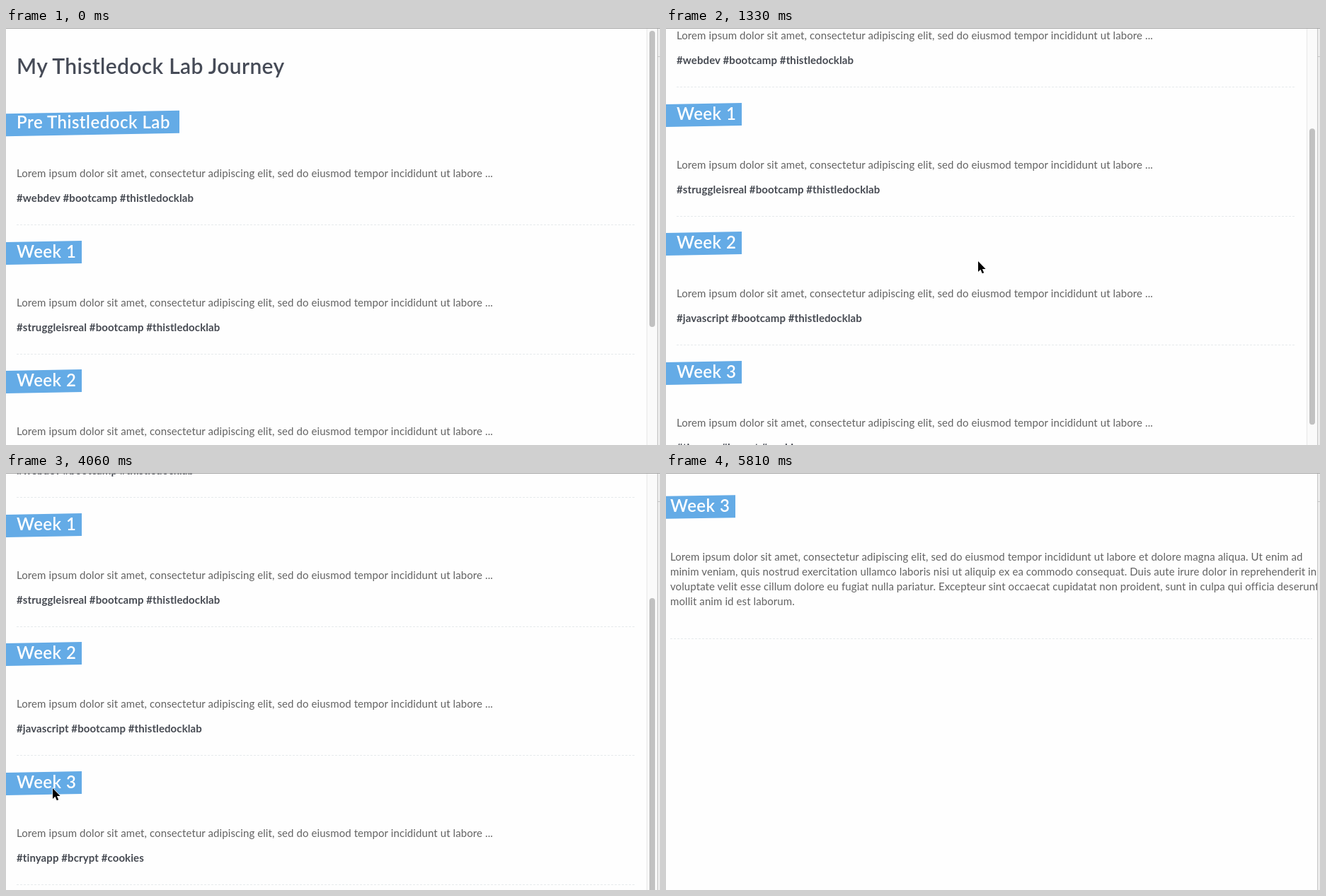
An HTML page that plays this animation: 924x590 px, repeating every 5.95 s.

```html
<!DOCTYPE html>
<html lang="en">
<head>
<meta charset="utf-8">
<title>Journey blog</title>
<style>
  html, body { margin: 0; height: 100%; overflow: hidden; background: #fefefe; }
  svg { display: block; font-family: Lato, sans-serif; }
  .heading { font-size: 30px; font-weight: 600; letter-spacing: .35px; fill: #464b57; }
  .title { font-size: 24px; font-weight: 600; letter-spacing: .5px; fill: #fff; }
  .copy { font-size: 15px; letter-spacing: .09px; fill: #636363; }
  .tags { font-size: 15px; font-weight: 700; letter-spacing: .1px; fill: #464a52; }
  .status { font: 13px "Liberation Sans", Arial, sans-serif; letter-spacing: .1px; fill: #50555c; }
  .banner { fill: #64abe6; }
  .rule { stroke: #e6eaec; stroke-dasharray: 3 2; }
</style>
</head>
<body>
<svg width="924" height="590" viewBox="0 0 924 590">
  <g id="list">
    <g id="posts"></g>
    <path d="M905 0h15v590h-15z" fill="#fafafa"/>
    <path d="M905.5 0v590" stroke="#e8e8e8"/>
    <rect id="thumb" x="909" width="8" height="419" rx="4" fill="#c1c1c1"/>
  </g>
  <path id="spinner" d="M445.2 34.2A19.5 19.5 0 0 1 472.8 34.2" fill="none" stroke="#7aa8cb" stroke-width="2"/>
  <g id="post"></g>
  <g id="status">
    <path d="M0 578h139q4 0 4 4v8H0z" fill="#adadad"/>
    <text class="status" x="4" y="593">localhost:8080/posts/5</text>
  </g>
  <path d="M921 0h3v590h-3z" fill="#ececec"/>
  <path d="M920.5 0v590M921 40.5h3" stroke="#c6c6c6"/>
  <path d="M0 .5h924" stroke="#a6a6a6"/>
  <path id="cursor" d="M0 0V15L3.4 11.8 5.8 17.3 8.2 16.2 5.9 10.9H10.6Z" stroke="#fff" stroke-width="1.2" paint-order="stroke"/>
</svg>
<script>
const LOOP = 5950, STEP = 70;
const $ = id => document.getElementById(id);

const lorem = "Lorem ipsum dolor sit amet, consectetur adipiscing elit, sed do eiusmod tempor incididunt ut labore ";
const article = [
  lorem + "et dolore magna aliqua. Ut enim ad",
  "minim veniam, quis nostrud exercitation ullamco laboris nisi ut aliquip ex ea commodo consequat. Duis aute irure dolor in reprehenderit in",
  "voluptate velit esse cillum dolore eu fugiat nulla pariatur. Excepteur sint occaecat cupidatat non proident, sunt in culpa qui officia deserunt",
  "mollit anim id est laborum."
];
const entries = [
  ["Pre Thistledock Lab", "#webdev #bootcamp #thistledocklab", 230],
  ["Week 1", "#struggleisreal #bootcamp #thistledocklab", 92],
  ["Week 2", "#javascript #bootcamp #thistledocklab", 92],
  ["Week 3", "#tinyapp #bcrypt #cookies", 92]
];

const text = (cls, x, y, s) => `<text class="${cls}" x="${x}" y="${y}">${s}</text>`;
const rule = (x1, x2, y) => `<path class="rule" d="M${x1} ${y + .5}H${x2}"/>`;

// Blue label skewed by one degree about its middle
function banner(x, y, width, title) {
  const right = x + width, tilt = right * Math.tan(Math.PI / 180) / 2;
  return `<path class="banner" d="M0 ${y + tilt}L${right} ${y - tilt}v32L0 ${y + 32 + tilt}z"/>`
    + text("title", x, y + 23, title);
}

$("posts").innerHTML = text("heading", 15, 65, "My Thistledock Lab Journey")
  + entries.map(([title, tags, width], i) => {
    const y = 119 + Math.round(i * 548 / 3);
    return banner(15, y, width, title) + text("copy", 15, y + 92, lorem + "...")
      + text("tags", 15, y + 127, tags) + rule(15, 889, y + 159);
  }).join("");

$("post").innerHTML = banner(6, 32, 92, "Week 3")
  + article.map((line, i) => text("copy", 6, 124 + 21 * i, line)).join("") + rule(6, 913, 234);

// Keys: [time, value, ...]
const scrollKeys = [[630, 0], [700, 4], [840, 32], [910, 56], [1050, 96], [1120, 96], [1190, 116],
  [1330, 195], [1470, 222], [1540, 226], [1610, 226], [1680, 231], [1820, 244]];
const cursorKeys = [[70, 900, 560], [630, 438, 331], [910, 438, 331], [1330, 441, 330], [1820, 461, 326],
  [2030, 461, 326], [2310, 440, 345], [2590, 440, 345], [3220, 146, 490], [3850, 70, 450],
  [4130, 64, 444], [5600, 64, 444], [5740, 70, 556]];
const statusKeys = [[4200, 0], [4340, 1], [4900, 1], [5180, 0]];

function sample(keys, t) {
  const n = keys.findIndex(k => k[0] > t);
  if (n === 0) return keys[0].slice(1);
  if (n < 0) return keys.at(-1).slice(1);
  const a = keys[n - 1], b = keys[n], p = (t - a[0]) / (b[0] - a[0]);
  return a.slice(1).map((v, i) => v + (b[i + 1] - v) * p);
}

const show = (id, on) => $(id).setAttribute("visibility", on ? "visible" : "hidden");
const move = (id, x, y) => $(id).setAttribute("transform", `translate(${x} ${y})`);

function draw(now) {
  const t = Math.floor(now % LOOP / STEP) * STEP;
  const [scroll] = sample(scrollKeys, t).map(Math.round);
  move("posts", 0, -scroll);
  $("thumb").setAttribute("y", 4 + scroll * .709);
  move("cursor", ...sample(cursorKeys, t).map(Math.round));
  $("status").setAttribute("opacity", sample(statusKeys, t)[0]);
  $("spinner").setAttribute("transform", `rotate(${(t - 4690) * .36} 459 48)`);
  show("list", t < 4690);
  show("spinner", t >= 4690 && t < 4830);
  show("post", t >= 4830);
  show("cursor", t >= 70 && t < 5810);
}

const start = performance.now();
function tick() {
  draw(performance.now() - start);
  requestAnimationFrame(tick);
}
tick();
</script>
</body>
</html>
```
